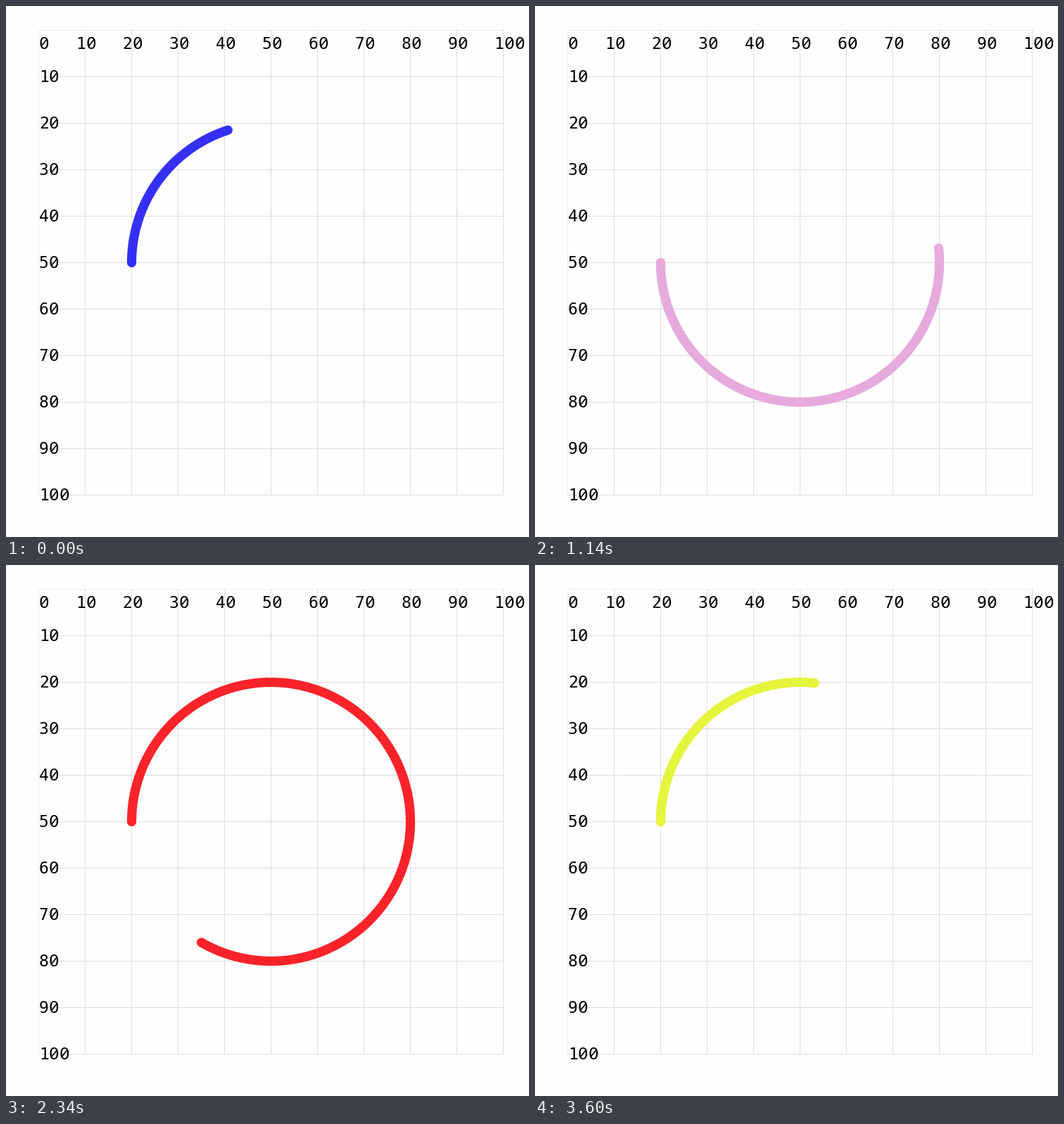
A matplotlib script for the animation above (3660 ms loop, 743 by 754 pixels).

```python
import numpy as np
import matplotlib.pyplot as plt
from matplotlib.animation import FuncAnimation
from matplotlib.colors import to_rgb

W, H, DPI = 743, 754, 64
FRAMES, INTERVAL = 61, 60
UNIT = 6.6                      # pixels per grid unit
X0, Y0 = 46.5, 34.5             # grid corner
CX, CY, R = X0 + 50 * UNIT, Y0 + 50 * UNIT, 30 * UNIT
ADVANCE = 14.5                  # monospaced cell width
STEP = 6                        # degrees per drawing step
STEPS_PER_FRAME = 244 / 60

# Stroke colour drifts through these keys (frame, colour)
COLOR_KEYS = [(0, "#342ff5"), (10, "#d684c3"), (19, "#e6aadc"), (31, "#dc73b2"),
              (39, "#fa2329"), (50, "#ff9206"), (60, "#e5f53c")]
KEY_TIMES = [k for k, _ in COLOR_KEYS]
KEY_RGB = np.array([to_rgb(c) for _, c in COLOR_KEYS])


def px(n):
    """Pixels to points."""
    return n * 72 / DPI


fig = plt.figure(figsize=(W / DPI, H / DPI), dpi=DPI, facecolor="#fefefe")
ax = fig.add_axes([0, 0, 1, 1])
ax.set_xlim(0, W)
ax.set_ylim(H, 0)
ax.axis("off")


def line(xs, ys, color, width, **kw):
    return ax.plot(xs, ys, color=color, lw=px(width), snap=False, **kw)[0]


def label(x, baseline, text):
    """Monospaced digits with slashed zeros."""
    for i, ch in enumerate(text):
        mid = x + (i + 0.5) * ADVANCE
        font = "DejaVu Sans" if ch == "0" else "DejaVu Sans Mono"
        ax.text(mid, baseline, ch, family=font, size=px(23), color="black",
                ha="center", va="baseline", zorder=3)
        if ch == "0":
            line([mid - 3.4, mid + 3.4], [baseline - 4.2, baseline - 12.6],
                 "black", 1.7, zorder=3)


def draw_grid():
    end = 100 * UNIT
    for k in range(11):
        d = 10 * k * UNIT
        color = "#ededed" if k == 0 else "#dddddd"
        line([X0 + d] * 2, [Y0, Y0 + end], color, 1, zorder=1)
        line([X0, X0 + end], [Y0 + d] * 2, color, 1, zorder=1)
        text = str(10 * k)
        label(X0 + d - (2 * UNIT if k else 0), Y0 + 4 * UNIT, text)
        if k:
            label(X0, Y0 + d + 7.8, text)


draw_grid()
arc = line([], [], "blue", 2 * UNIT, solid_capstyle="round",
           solid_joinstyle="round", zorder=2)


def update(frame):
    # Half a cycle draws the circle clockwise, the other half erases it
    step = 12 + int(0.36 + frame * STEPS_PER_FRAME)
    sweep = step * STEP % 720
    start, stop = (0, sweep) if sweep < 360 else (sweep - 360, 360)
    a = np.radians(np.linspace(start, stop, 121))
    arc.set_data(CX - R * np.cos(a), CY - R * np.sin(a))
    arc.set_color([np.interp(frame, KEY_TIMES, KEY_RGB[:, c]) for c in range(3)])
    return [arc]


anim = FuncAnimation(fig, update, frames=FRAMES, interval=INTERVAL,
                     repeat=True, repeat_delay=0, blit=False)
plt.show()
```
